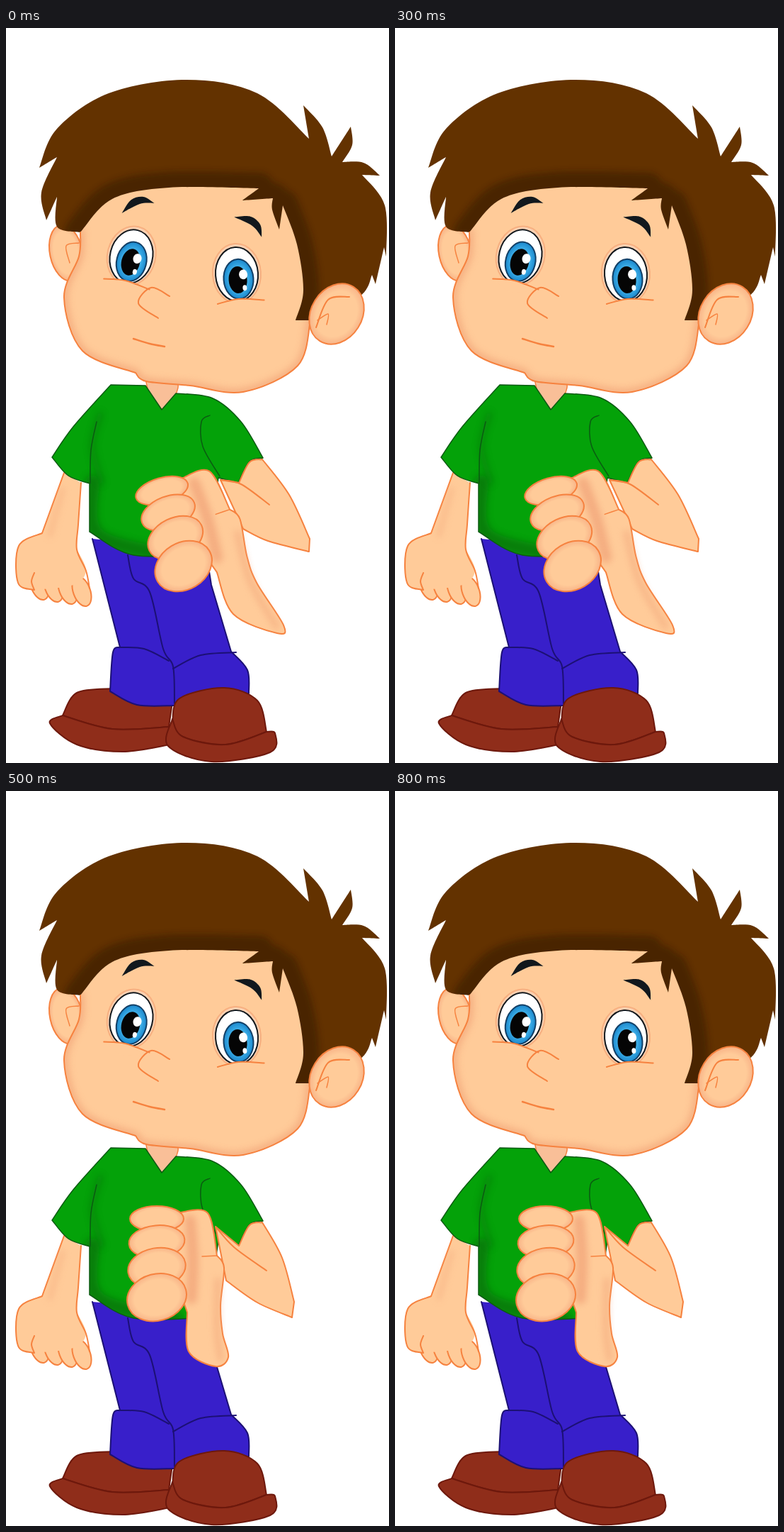
These frames come from a looping animation (541x1036 px, 900 ms). An HTML page:

```html
<!DOCTYPE html>
<html lang="en">
<head>
<meta charset="utf-8">
<title>Thumb down</title>
<style>
html, body { margin: 0; width: 100%; height: 100%; overflow: hidden; background: #fff; }
svg { display: block; width: 541px; height: 1036px; }
path { stroke-linecap: round; stroke-linejoin: round; }
</style>
</head>
<body>
<svg id="stage" viewBox="0 0 541 1036"></svg>
<script>
const SKIN = '#ffcb99', ORANGE = '#f6823f', SHADE = '#f2a67a', INK = '#12181d';
const HAIR = '#633200', GREEN = '#04a209', PINE = '#0b5b12';
const BLUE = '#381fca', NAVY = '#1c1075', SHOE = '#8f2d1a', RUST = '#6d180c';

// Smooth curve through "x,y" points; "|" makes the point before it a corner.
function curve(text) {
  let d = '', last;
  for (const run of text.split('|')) {
    const p = run.trim().split(/\s+/).map(q => q.split(',').map(Number));
    if (last) p.unshift(last); else d = 'M' + p[0];
    for (let i = 0; i < p.length - 1; i++) {
      const b = p[i], c = p[i + 1], a = p[i - 1] || b, e = p[i + 2] || c;
      const c1 = b.map((v, n) => v + (c[n] - a[n]) / 6);
      const c2 = c.map((v, n) => v - (e[n] - b[n]) / 6);
      d += `C${c1} ${c2} ${c}`;
    }
    last = p.at(-1);
  }
  return d;
}
const shape = (pts, fill, line = 'none', w = 2, extra = '') =>
  `<path d="${curve(pts)}" fill="${fill}" stroke="${line}" stroke-width="${w}" ${extra}/>`;
const stroke = (pts, color, w = 2) => shape(pts, 'none', color, w);
const blurred = (pts, color, w, alpha) =>
  shape(pts, 'none', color, w, `filter="url(#blur)" opacity="${alpha}"`);
const within = (id, pts, ...look) => `<g clip-path="url(#${id})">${blurred(pts, ...look)}</g>`;
const oval = (x, y, rx, ry, fill, line = 'none', turn = 0) =>
  `<ellipse rx="${rx}" ry="${ry}" transform="translate(${x} ${y}) rotate(${turn})" fill="${fill}" stroke="${line}" stroke-width="2"/>`;
const place = (x, y, turn, parts) => `<g transform="translate(${x} ${y}) rotate(${turn})">${parts}</g>`;
const clip = (id, pts) => `<clipPath id="${id}"><path d="${curve(pts)}"/></clipPath>`;
const times = (n, make) => Array.from({ length: n }, (_, i) => make(i)).join('');

const jaw = '105,288 103,322 82,380 108,455 183,486 | 198,498 260,504 335,513 412,476 430,412';
const fringe = '409,412 | 420,370 411,305 391,250 | 386,284 | 376,256 377,240 | 334,243 | 357,226 | 230,225 150,241 105,288';
const face = jaw + ' | ' + fringe;
const hair = `105,288 72,280 72,238 | 57,271 | 50,232 72,182 | 47,197 | 72,142 145,92 255,73 355,92 428,156
  | 420,109 | 447,140 460,181 | 487,139 | 489,165 475,189 | 505,190 528,208 | 503,207
  | 535,250 537,322 | 534,309 | 522,361 | 517,348 | 500,378 428,420 | 105,288`;
const shirt = `148,503 197,504 | 220,538 | 240,515 | 292,522 332,555 363,606 | 344,611 328,641
  | 300,634 | 284,742 | 180,743 118,710 | 118,642 | 88,631 65,605 | 95,562 148,503`;

const eye = (x, y, turn) => place(x, y, turn,
  oval(0, -1, 34, 42, '#fbd0b0', '#f8b080') +
  oval(0, 0, 30, 38, '#fff', INK) +
  oval(2, 7, 21, 28, 'url(#iris)', '#123f66') +
  oval(1, 8, 13, 19, '#050505') +
  oval(9, 1, 6, 7, '#fff') + oval(10, 20, 3, 4, '#fff') +
  shape('-30,40 0,35 36,39 | 0,52 -30,40', SKIN) + stroke('-30,40 0,35 36,39', ORANGE));
const brow = (x, y, turn) => place(x, y, turn, shape('-24,2 -6,-12 12,-11 24,2 | 4,-3 -24,2', INK));

const legs = () =>
  shape('80,969 100,937 150,931 | 235,950 | 230,985 | 150,988 80,969', SHOE, RUST) +
  shape('80,969 62,980 100,1010 165,1020 232,1010 | 230,985 | 150,988 80,969', SHOE, RUST) +
  shape('122,720 161,873 | 151,880 147,935 | 185,954 238,955 | 280,936 343,938 | 341,905 318,879 | 290,785 | 282,735', BLUE, NAVY) +
  stroke('172,743 180,776 203,795 222,875 236,900 238,952', NAVY) +
  stroke('161,873 195,875 230,892', NAVY) + stroke('236,903 275,884 325,880', NAVY) +
  shape('235,980 245,945 308,930 355,948 368,992 | 310,1010 250,999 235,980', SHOE, RUST) +
  shape('235,974 229,1012 290,1034 373,1021 380,994 368,992 | 310,1010 250,999 235,974', SHOE, RUST);

const hangingArm = () =>
  times(4, i => oval(47 + 20 * i, 785 + 3 * i, 12, 22, SKIN, ORANGE, -20)) +
  shape('82,627 51,712 | 18,730 17,782 40,792 | 95,785 113,765 100,735 | 102,700 106,641', SKIN) +
  stroke('82,627 51,712 | 18,730 17,782 40,792 | 36,780 40,768', ORANGE) +
  stroke('106,641 102,700 100,735 113,765 118,790', ORANGE) +
  blurred('80,650 62,715', SHADE, 6, .5);

const torso = () =>
  shape('197,495 240,499 240,517 | 221,538 | 205,524 197,495', '#f9bf98', ORANGE, 1.5) +
  shape(shirt, GREEN) +
  within('shirt', '122,640 130,715 240,745', '#07670d', 20, .6) +
  within('shirt', '133,545 122,590 135,640', '#07670d', 8, .4) +
  shape(shirt, 'none', PINE, 1.5) +
  stroke('128,555 120,595 119,642', PINE, 1.5) + stroke('288,546 276,555 278,590 302,632', PINE, 1.5);

const head = () =>
  oval(85, 317, 23, 40, 'url(#flesh)', ORANGE, -12) +
  stroke('103,303 85,307 90,331', ORANGE, 1.5) +
  shape(hair, HAIR) +
  within('hair', fringe, '#2c1500', 44, .45) +
  shape(face, SKIN) +
  within('face', jaw, SHADE, 12, .7) +
  stroke(jaw, ORANGE) +
  oval(467, 403, 36, 45, 'url(#flesh)', ORANGE, 32) +
  stroke('485,379 455,383 438,422', ORANGE) + stroke('440,412 455,403 453,418', ORANGE, 1.5) +
  eye(177, 322, 14) + eye(326, 347, -4) +
  brow(186, 252, -17) + brow(343, 279, 36) +
  stroke('231,378 205,366 187,388 215,409', ORANGE) +
  stroke('180,438 203,445 224,449', ORANGE, 2.5);

// Raised arm: drop 0 is held high, drop 1 swings the fist out and stretches the thumb.
function raisedArm(drop) {
  const at = (x, y, dx, dy) => `${x + dx * drop},${y + dy * drop}`;
  const top = at(296, 614, 7, 23);
  const forearm = `362,608 | ${at(390, 658, 10, 0)} ${at(407, 720, 22, 0)} | ${at(404, 742, 24, -4)}
    | ${at(355, 721, 15, 2)} ${at(311, 690, 24, 16)} | ${top} | 329,641 | 344,612 362,608`;
  const palm = `245,594 285,595 298,655 | 308,672 303,725 306,765 ${at(314, 798, 12, 35)}
    ${at(296, 811, 18, 30)} ${at(258, 790, 4, 8)} 256,735 | 230,650 245,594`;
  const fist = shape(palm, SKIN, ORANGE) +
    blurred('260,605 264,660 262,715', SHADE, 16, .8) +
    blurred(`299,690 298,760 ${at(303, 800, 13, 32)}`, SHADE, 8, .6) +
    stroke('298,655 277,656', ORANGE, 1.5) +
    times(4, i => oval(213, 603 + 30 * i + 2.3 * i * i, 38 + 1.5 * i, 18 + 5 * i, 'url(#flesh)', ORANGE, -5 * i));
  return shape(forearm, SKIN, ORANGE) +
    stroke(`${top} ${at(322, 643, 10, 0)} ${at(368, 676, 4, -4)}`, ORANGE) +
    `<g transform="translate(${7 * drop} ${48 * drop}) rotate(${-16 * drop} 217 603)">${fist}</g>`;
}

const stage = document.getElementById('stage');
stage.innerHTML = `<defs>
  <filter id="blur" x="-200" y="-200" width="900" height="1400" filterUnits="userSpaceOnUse"><feGaussianBlur stdDeviation="5"/></filter>
  <radialGradient id="iris"><stop offset=".5" stop-color="#4bbdf2"/><stop offset="1" stop-color="#1a87cc"/></radialGradient>
  <radialGradient id="flesh"><stop offset=".75" stop-color="${SKIN}"/><stop offset="1" stop-color="#f8b488"/></radialGradient>
  ${clip('hair', hair)}${clip('face', face)}${clip('shirt', shirt)}
</defs>` + legs() + hangingArm() + torso() + head() + '<g id="arm"></g>';
const armGroup = document.getElementById('arm');

// Arm position in each 100 ms step
const drops = [1, .5, 0, 1, .5, 0, .5, 1, 0];
let shown;
const start = performance.now();
function tick() {
  const drop = drops[Math.floor((performance.now() - start) % 900 / 100)];
  if (drop !== shown) armGroup.innerHTML = raisedArm(shown = drop);
  requestAnimationFrame(tick);
}
tick();
</script>
</body>
</html>
```
